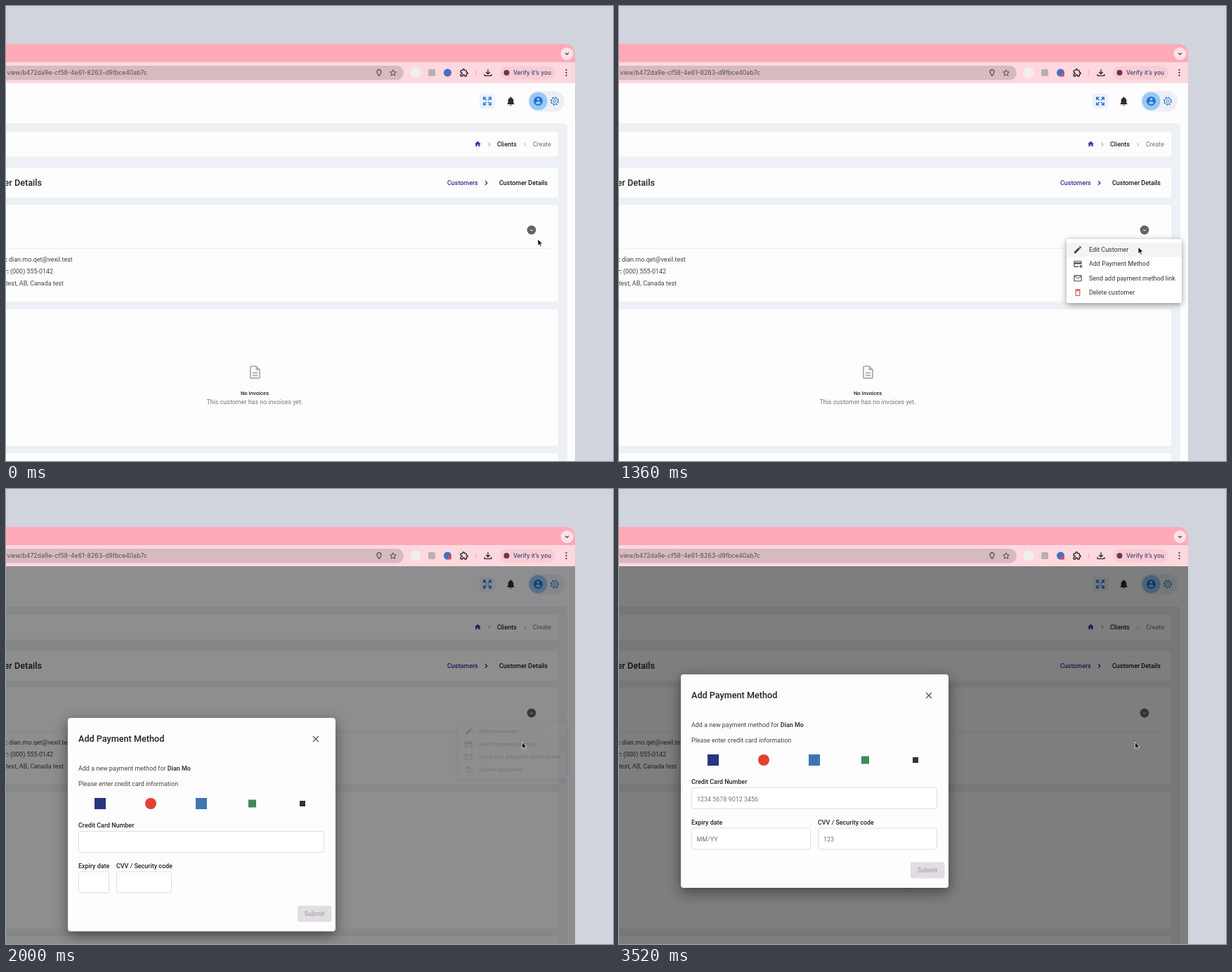
Animation, 864 px wide and 648 px high, one loop 3840 ms. Source, as an HTML page:

```html
<!DOCTYPE html>
<html lang="en">
<head>
<meta charset="utf-8">
<title>Add payment method</title>
<style>
  html, body { margin: 0; width: 100%; height: 100%; overflow: hidden; background: #d1d4dd; }
  svg { display: block; width: 864px; height: 648px; font: 8.95px Roboto, sans-serif; }
  .chrome { font-family: Inter, sans-serif; }
  .medium { font-weight: 500; }
  .bold { font-weight: 700; }
  .title { font-size: 12.65px; font-weight: 500; }
  .end { text-anchor: end; }
  .middle { text-anchor: middle; }
  #menu { transform-origin: 748px 332px; }
  #menuPaper { filter: drop-shadow(0 2px 4px #0006); }
  #modalPaper { filter: drop-shadow(0 6px 10px #0007); }
</style>
</head>
<body>
<svg id="stage" viewBox="0 0 864 648"></svg>
<script>
const box = (x, y, w, h, fill, r = 0, extra = '') =>
  `<rect x="${x}" y="${y}" width="${w}" height="${h}" rx="${r}" fill="${fill}" ${extra}/>`;
const dot = (x, y, r, fill, extra = '') =>
  `<circle cx="${x}" cy="${y}" r="${r}" fill="${fill}" ${extra}/>`;
const text = (x, y, str, fill = '#424242', cls = '', extra = '') =>
  `<text x="${x}" y="${y}" fill="${fill}" class="${cls}" ${extra}>${str}</text>`;
const line = (d, stroke, width = 1) =>
  `<path d="${d}" fill="none" stroke="${stroke}" stroke-width="${width}"/>`;
const field = (x, y, w, id = '') =>
  box(x + .5, y + .5, w - 1, 30, '#fff', 2.5, `id="${id}" stroke="#dedee2"`);

// Icons live in a 24 x 24 box and are centred on x, y.
const icons = {
  bell: 'M12 22c1.1 0 2-.9 2-2h-4c0 1.1.9 2 2 2zm6-6v-5c0-3.07-1.64-5.64-4.5-6.32V4a1.5 1.5 0 0 0-3 0v.68C7.63 5.36 6 7.92 6 11v5l-2 2v1h16v-1z',
  account: 'M12 2a10 10 0 1 0 0 20 10 10 0 0 0 0-20zm0 3a3 3 0 1 1 0 6 3 3 0 0 1 0-6zm0 14.2c-2.5 0-4.7-1.28-6-3.22 0-2 4-3.08 6-3.08s6 1.09 6 3.08a7.2 7.2 0 0 1-6 3.22z',
  page: 'M8 16h8v2H8zm0-4h8v2H8zm6-10H6a2 2 0 0 0-2 2v16c0 1.1.9 2 2 2h12a2 2 0 0 0 2-2V8zm4 18H6V4h7v5h5z',
  edit: 'M3 17.25V21h3.75L17.8 9.94l-3.75-3.75zM20.7 7.04a1 1 0 0 0 0-1.41l-2.34-2.34a1 1 0 0 0-1.41 0l-1.83 1.83 3.75 3.75z',
  card: 'M20 4H4a2 2 0 0 0-2 2v12c0 1.1.9 2 2 2h10v-2H4v-6h18V6a2 2 0 0 0-2-2zm0 4H4V6h16zm4 9v2h-3v3h-2v-3h-3v-2h3v-3h2v3z',
  mail: 'M22 6a2 2 0 0 0-2-2H4a2 2 0 0 0-2 2v12c0 1.1.9 2 2 2h16a2 2 0 0 0 2-2zm-2 0-8 5-8-5zm0 12H4V8l8 5 8-5z',
  trash: 'M16 9v10H8V9zm-1.5-6h-5l-1 1H5v2h14V4h-3.5zM18 7H6v12c0 1.1.9 2 2 2h8a2 2 0 0 0 2-2z',
  home: 'M10 20v-6h4v6h5v-8h3L12 3 2 12h3v8z',
  puzzle: 'M20.5 11H19V7c0-1.1-.9-2-2-2h-4V3.5a2.5 2.5 0 0 0-5 0V5H4a2 2 0 0 0-2 2v3.8h1.5a2.7 2.7 0 0 1 0 5.4H2V22h5.8v-1.5a2.7 2.7 0 0 1 5.4 0V22H19v-6h1.5a2.5 2.5 0 0 0 0-5z',
  pin: 'M12 2a7 7 0 0 0-7 7c0 5.2 7 13 7 13s7-7.8 7-13a7 7 0 0 0-7-7zm0 6v2',
  star: 'M12 2l3 7 7.5.6-5.7 5 1.7 7.4-6.5-4-6.5 4 1.7-7.4-5.7-5L9 9z',
  download: 'M12 2v13M6 10l6 6 6-6M2 16v5h20v-5',
  expand: 'M3 9V3h6M15 3h6v6M21 15v6h-6M9 21H3v-6M3 3l7 7M21 3l-7 7M21 21l-7-7M3 21l7-7',
  right: 'M8 4l8 8-8 8',
  down: 'M4 8l8 8 8-8',
  close: 'M3 3l18 18M21 3L3 21'
};
const icon = (name, x, y, size, color, stroke = 0) => {
  const paint = stroke ? `fill="none" stroke="${color}" stroke-width="${stroke}"` : `fill="${color}" fill-rule="evenodd"`;
  return `<path d="${icons[name]}" ${paint} transform="translate(${x} ${y}) scale(${size / 24}) translate(-12 -12)"/>`;
};

const browser = [
  '<path d="M0 54H794Q810 54 810 70V110H0Z" fill="#fdabb9"/>',
  box(0, 80, 810, 30, '#fed8df'),
  dot(798.5, 68, 9, '#fee0e5'), icon('down', 798.5, 68, 7, '#333', 4),
  box(-20, 85, 586, 20.5, '#d7bac1', 10),
  text(201, 98.2, 'view/b472da9e-cf58-4e61-8263-d9fbce40ab7c', '#574c50', 'chrome end', 'font-size="8.7"'),
  icon('pin', 531, 95, 10.5, '#51464a', 2.5), icon('star', 551, 95, 10, '#51464a', 2.4),
  dot(583, 95, 7.5, '#f1eeef'), box(601, 90, 10, 10, '#b9b0b3', 2),
  dot(628.5, 95, 5.5, '#4470c4'), '<g id="badge">', dot(631.5, 98, 2.6, '#e5484d'), '</g>',
  icon('puzzle', 652, 95, 11.5, '#30282b', 2.8),
  line('M669 91V99', '#f4a9b6'),
  icon('download', 686, 95, 11.5, '#30282b', 2.8),
  box(703, 85.5, 79, 19.5, '#f9ccd5', 9.7), dot(712.5, 95, 4, '#6f3548'),
  text(722, 98, 'Verify it’s you', '#35446f', 'chrome medium', 'font-size="8.35"'),
  [91, 95, 99].map(y => dot(797.5, y, 1.1, '#30282b')).join('')
];

const header = [
  box(0, 110, 810, 538, '#fdfdfe'),
  box(674, 125, 22, 21, '#ecf1fa', 4), icon('expand', 685, 135.5, 14, '#2a78d8', 2.6),
  icon('bell', 718.5, 135.5, 15.5, '#2c2c2e'),
  box(743, 121, 52, 29.5, '#ecf0f4', 14.7), dot(757.5, 135.5, 13, '#98c7f4'),
  icon('account', 757.5, 135.5, 15.5, '#1d70cf'),
  dot(781, 135.5, 4.5, 'none', 'stroke="#3a7fc6"'), dot(781, 135.5, 1.9, 'none', 'stroke="#3a7fc6"'),
  dot(781, 135.5, 5.4, 'none', 'stroke="#3a7fc6" stroke-width="1.4" stroke-dasharray="2.1 2.14"')
];

const page = [
  box(-10, 167, 809, 500, '#edf0f4', 5),
  [[179, 35.5], [230.5, 42.5], [283, 138], [432, 194.5], [637, 30]]
    .map(([y, h]) => box(-10, y, 796, h, '#fdfdfd', 4)).join(''),
  icon('home', 671.5, 196.5, 10.5, '#4a2fa5'),
  icon('right', 688, 197, 7, '#777', 3), text(699, 200, 'Clients', '#222', 'medium'),
  icon('right', 738.5, 197, 7, '#999', 3), text(750, 200, 'Create', '#707070'),
  text(51, 256, 'Customer Details', '#222', 'title end'),
  text(628, 255, 'Customers', '#3a2a9b', 'medium'), icon('right', 683.5, 252, 8, '#3a2a9b', 4),
  text(702, 255, 'Customer Details', '#151515', 'medium'),
  line('M0 345H776', '#ececee'),
  text(2, 364, 'Email:', '#333', 'bold end'), text(4, 364, 'dian.mo.qet@vexil.test'),
  text(4, 381, 'Phone Number:', '#333', 'bold end'), text(6, 381, '(000) 555-0142'),
  text(82, 398, 'test, AB, Canada test', '#424242', 'end'),
  '<g id="halo">', dot(748, 319, 9.5, '#0000001c'), '</g>',
  dot(748, 319, 6.4, '#646464'), icon('down', 748, 319.3, 6, '#fff', 4),
  icon('page', 354.5, 521.5, 22.5, '#b2b2b2'),
  text(354, 554, 'No Invoices', '#222', 'medium middle', 'font-size="7.65"'),
  text(354, 567, 'This customer has no invoices yet.', '#777', 'middle')
];

const rowTop = 337, rowHeight = 20.3;
const menuItems = [
  ['edit', 'Edit Customer'], ['card', 'Add Payment Method'],
  ['mail', 'Send add payment method link'], ['trash', 'Delete customer']
];
const menu = [
  '<clipPath id="rowClip">', box(637, rowTop + rowHeight, 164, rowHeight, '#000'), '</clipPath><g id="menu">',
  box(637, 332, 164, 91, '#fff', 3, 'id="menuPaper"'),
  box(637, 0, 164, rowHeight, '#0000000b', 0, 'id="hover"'),
  dot(734.5, 363, 0, '#00000020', 'id="ripple" clip-path="url(#rowClip)"'),
  menuItems.map(([name, label], i) => {
    const y = rowTop + rowHeight * (i + .5);
    return icon(name, 653, y, 13.5, name === 'trash' ? '#d84b50' : '#484848') + text(669, y + 3, label, '#333');
  }).join(''),
  '</g>'
];

const modal = [
  '<g id="modal">', box(88, 264, 381, 304, '#fdfdfd', 4, 'id="modalPaper"'),
  text(103, 298.3, 'Add Payment Method', '#222', 'title'), icon('close', 441, 294, 10.5, '#555', 3),
  text(103, 338.5, 'Add a new payment method for <tspan class="bold">Dian Mo</tspan>'),
  text(103, 360.5, 'Please enter credit card information'),
  box(126, 378, 16, 16, '#26367f'), dot(206, 386, 8, '#e3402f'), box(270, 378, 16, 16, '#3f75b3'),
  box(345, 380.5, 11, 11, '#3f8a5a'), box(418, 382, 8, 8, '#333'),
  text(103, 420, 'Credit Card Number', '#222', 'medium'), field(103, 425, 350),
  text(103, 477.5, 'Expiry date', '#222', 'medium'), field(103, 482.5, 44, 'expiry'),
  text(157, 477.5, 'CVV / Security code', '#222', 'medium', 'id="cvvLabel"'), field(157, 482.5, 79, 'cvv'),
  '<g id="hints">', text(111, 444.5, '1234 5678 9012 3456', '#757575'),
  text(110.5, 502, 'MM/YY', '#757575'), text(291, 502, '123', '#757575'), '</g>',
  box(415, 531.5, 48.5, 23, '#e1dde2', 2.5), text(439, 546.3, 'Submit', '#aaa4aa', 'medium middle'),
  '</g>'
];

const cursor = '<path id="cursor" d="M0 0V9.3L2.2 7.3 3.6 10.5 5.2 9.8 3.8 6.7H6.7Z" fill="#111" stroke="#fff" stroke-width=".7"/>';

document.getElementById('stage').innerHTML = [
  ...header, ...page, ...browser, ...menu,
  box(0, 110, 810, 538, '#000', 0, 'id="shade"'), ...modal, cursor
].join('');

const ids = ['badge', 'halo', 'menu', 'hover', 'ripple', 'shade', 'modal', 'expiry', 'cvv', 'cvvLabel', 'hints', 'cursor'];
const el = Object.fromEntries(ids.map(id => [id, document.getElementById(id)]));
const set = (id, attrs) => { for (const key in attrs) el[id].setAttribute(key, attrs[key]); };
const show = (id, on) => { el[id].style.display = on ? '' : 'none'; };

const LOOP = 3840, STEP = 80;
const ease = (t, from, to) => {
  const p = Math.min(1, Math.max(0, (t - from) / (to - from)));
  return p * p * (3 - 2 * p);
};
// Latest value whose start time has passed.
const held = (t, keys) => keys.reduce((value, [start, next]) => t >= start ? next : value, 0);

function draw(t) {
  const reach = ease(t, 0, 560), drop = ease(t, 1040, 1600);
  const x = 757 - 10.7 * reach - 11.8 * drop;
  const y = 332 - 15 * reach + 43.5 * drop;
  set('cursor', { transform: `translate(${x} ${y})` });
  show('halo', Math.hypot(x - 748, y - 319) < 9.5);
  show('badge', t >= 640);

  const closing = t >= 2000;
  const grow = closing ? .77 : ease(t, 590, 830);
  const scale = .75 + .25 * grow;
  show('menu', t >= 640 && t < 2160);
  el.menu.style.transform = `scale(${scale}, ${scale * scale})`;
  el.menu.style.opacity = closing ? .22 : grow;
  const row = Math.floor((y - rowTop) / rowHeight);
  show('hover', row >= 0);
  set('hover', { y: rowTop + row * rowHeight });
  set('ripple', { r: held(t, [[1760, 4], [1840, 11], [1920, 45], [2000, 0]]) });

  set('shade', { opacity: held(t, [[1920, .17], [2000, .44], [2160, .5]]) });
  show('modal', t >= 1920);
  set('modal', { transform: `translate(0 ${held(t, [[1920, 219.5], [2000, 62], [2160, 2], [2240, 0]])})` });

  const wide = t >= 3360, cvvX = wide ? 283 : 157;
  set('expiry', { width: wide ? 169 : 43 });
  set('cvv', { x: cvvX + .5, width: wide ? 169 : 78 });
  set('cvvLabel', { x: cvvX });
  show('hints', t >= 3520);
}

const begin = performance.now();
function frame() {
  const t = (performance.now() - begin) % LOOP;
  draw(Math.floor(t / STEP) * STEP);
  requestAnimationFrame(frame);
}
frame();
</script>
</body>
</html>
```
